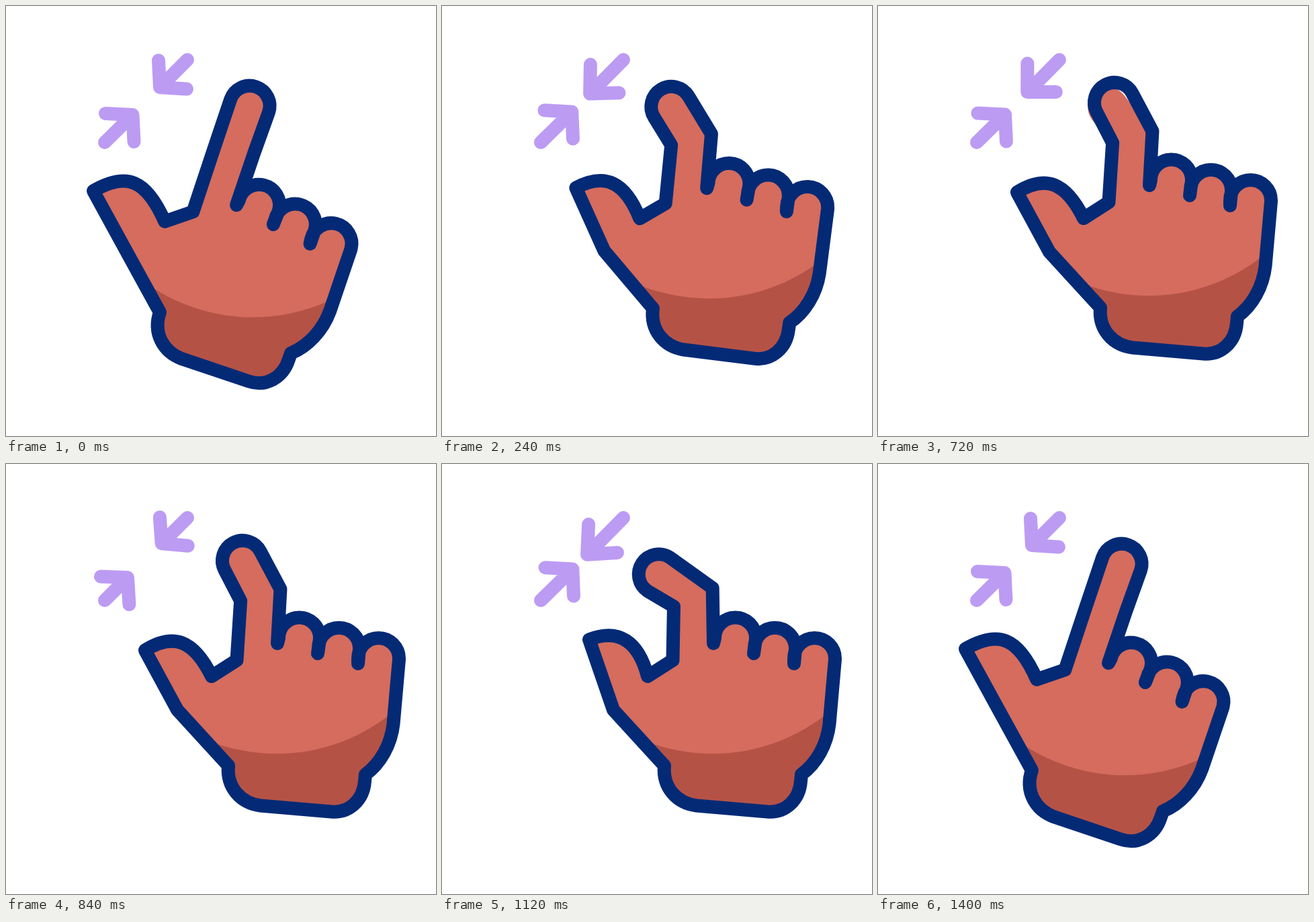
Recreate the animation shown at these times as an HTML page with a canvas. Size 640x640 px, loop 1.48 s.

```html
<!DOCTYPE html>
<html>
<head>
<meta charset="utf-8">
<style>
  html, body { margin: 0; width: 100%; height: 100%; overflow: hidden; background: #fff; }
  canvas { display: block; width: 100vmin; height: 100vmin; }
</style>
</head>
<body>
<canvas width="640" height="640"></canvas>
<script>
const ctx = document.querySelector('canvas').getContext('2d');
const LOOP = 1480, STEP = 40;
const NAVY = '#042a76', SKIN = '#d56c5d', SHADE = '#b55246', LILAC = '#bc9bf3';
const TILT = 13.7 * Math.PI / 180;

const mix = (a, b, k) => a + (b - a) * k;
const mixPoint = (a, b, k) => [mix(a[0], b[0], k), mix(a[1], b[1], k)];
const ramp = (t, from, to) => Math.min(1, Math.max(0, (t - from) / (to - from)));

const turnAt = t => ramp(t, 40, 280) - ramp(t, 1160, 1380);

// Pinch, relax halfway, pinch again, open
const bendAt = (t, relaxed) => ramp(t, 40, 400) - .52 * ramp(t, 600, relaxed)
  + .52 * ramp(t, 1000, 1160) - ramp(t, 1160, 1380);

const arrowAt = (t, swing) => ramp(t, 40, 400) - ramp(t, 1160, 1400)
  - swing * (ramp(t, 600, 880) - ramp(t, 880, 1160));

function handPath(bend) {
  const p = new Path2D();

  const thumb = mixPoint([192, 297], [223, 256], bend);
  const curve1 = mixPoint([233, 258], [268, 242], bend);
  const curve2 = mixPoint([264, 261], [297, 265], bend);
  p.moveTo(...thumb);
  p.bezierCurveTo(...curve1, ...curve2, 306, 316);

  // Index finger: the joint folds later than the tip travels
  const fold = bend * bend;
  const tip = mixPoint([388, 119], [313, 171], bend);
  const inner = mixPoint([351, 200], [343, 216], fold);
  const outer = mixPoint([411, 187], [400, 184], fold);
  const axis = Math.atan2(tip[1] - (inner[1] + outer[1]) / 2, tip[0] - (inner[0] + outer[0]) / 2);
  p.lineTo(343.5, 292);
  p.lineTo(...inner);
  p.arc(...tip, 30, axis - Math.PI / 2, axis + Math.PI / 2);
  p.lineTo(...outer);

  for (let i = 0; i < 3; i++) {
    p.lineTo(404 + 60 * i, 267 + 15 * i);
    p.arc(436.5 + 59 * i, 259 + 15.2 * i, 30.5, Math.PI, .06);
  }

  // Side of the palm, cuff and wrist
  p.lineTo(576.5, 387);
  p.bezierCurveTo(573, 418, 557, 446, 535, 462);
  p.lineTo(534, 472);
  p.bezierCurveTo(532, 500, 511, 520, 484, 517.5);
  p.lineTo(379, 508.5);
  p.bezierCurveTo(350, 505, 328, 482, 331, 449);
  p.lineTo(255, 366);
  p.closePath();
  return p;
}

const palmShade = new Path2D('M300 412L315 417C400 445 495 432 570 374L620 374V560H300Z');

function drawHand(t) {
  const turn = turnAt(t);
  const outline = handPath(bendAt(t, 720));
  const body = handPath(bendAt(t, 760)); // the fill trails the outline while relaxing
  ctx.save();
  ctx.translate(mix(238, 340, turn), mix(457, 448, turn));
  ctx.rotate((1 - turn) * TILT);
  ctx.translate(-340, -448);
  ctx.fillStyle = SKIN;
  ctx.fill(body);
  ctx.save();
  ctx.clip(body);
  ctx.fillStyle = SHADE;
  ctx.fill(palmShade);
  ctx.restore();
  ctx.strokeStyle = NAVY;
  ctx.stroke(outline);
  ctx.restore();
}

// open and shut each hold barb, head, barb
function drawArrow(tail, open, shut, k) {
  const [barb1, head, barb2] = open.map((point, i) => mixPoint(point, shut[i], k));
  ctx.beginPath();
  ctx.moveTo(...tail);
  ctx.lineTo(...head);
  ctx.moveTo(...barb1);
  ctx.lineTo(...head);
  ctx.lineTo(...barb2);
  ctx.strokeStyle = LILAC;
  ctx.stroke();
}

function draw(now) {
  const t = Math.floor(now % LOOP / STEP) * STEP;
  ctx.fillStyle = '#fff';
  ctx.fillRect(0, 0, 640, 640);
  ctx.lineWidth = 20;
  ctx.lineCap = ctx.lineJoin = 'round';
  drawArrow([270, 80], [[227, 81], [229, 121], [269, 123.5]],
    [[216, 92], [213, 138], [259, 134]], arrowAt(t, 1.36));
  drawArrow([147, 203], [[148, 160], [188.5, 162], [190.5, 202]],
    [[156, 151.5], [197, 154], [198.5, 194]], arrowAt(t, 2.2));
  drawHand(t);
}

const start = performance.now();
(function frame() {
  draw(performance.now() - start);
  requestAnimationFrame(frame);
})();
</script>
</body>
</html>
```
